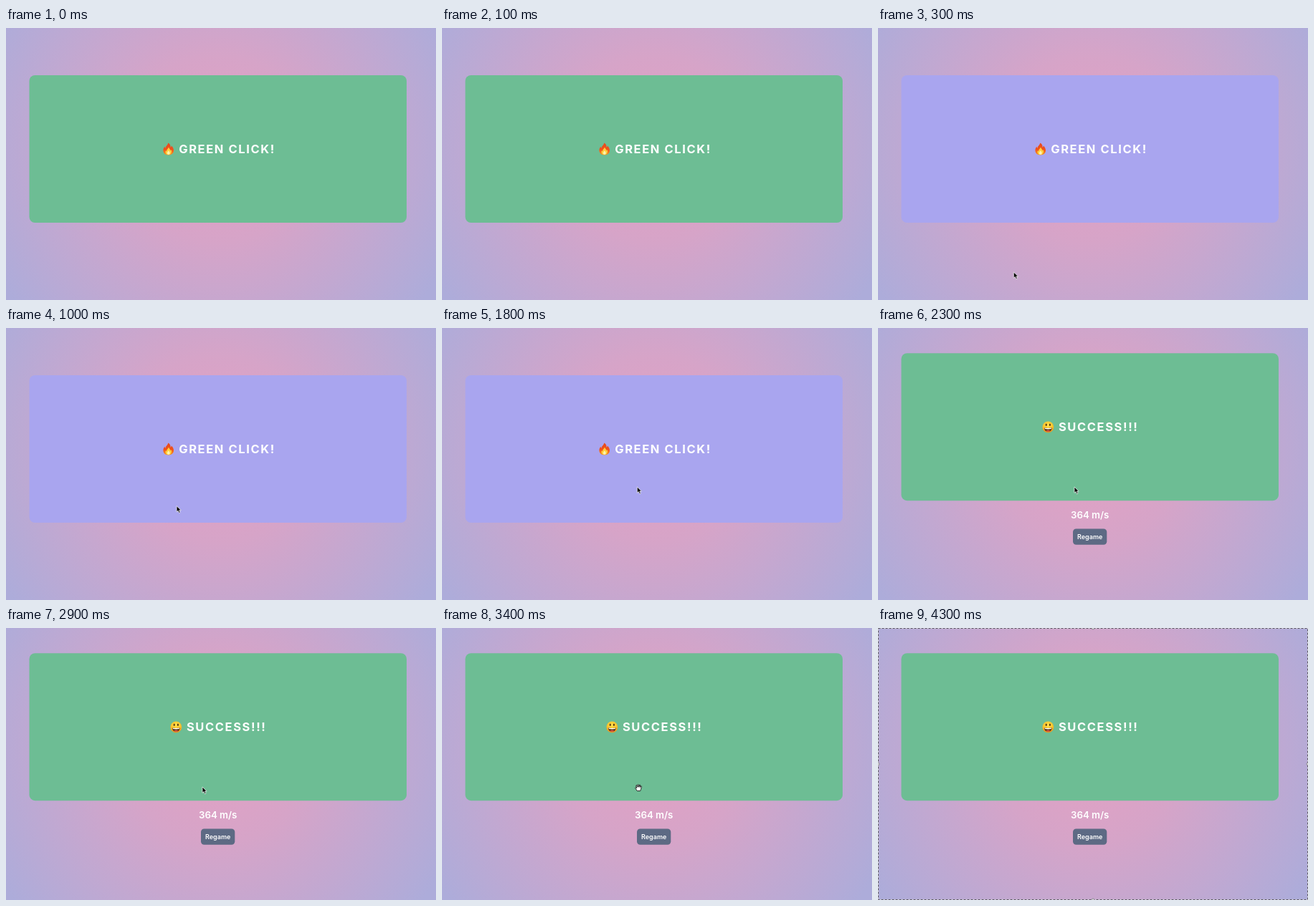
An HTML page for the animation above (4400 ms loop, 600 px wide and 380 px high).

```html
<!DOCTYPE html>
<html lang="en">
<head>
<meta charset="utf-8">
<title>Green click</title>
<style>
  html, body { margin: 0; width: 100%; height: 100%; overflow: hidden; }
  svg { display: block; width: 600px; height: 380px; }
  text { font-family: Inter, "Liberation Sans", sans-serif; fill: #fff; }
  .title { font-size: 16.5px; font-weight: 700; letter-spacing: 1.6px; }
  .score { font-size: 13.3px; font-weight: 600; }
  .button { font-size: 9px; font-weight: 600; }
</style>
</head>
<body>
<svg viewBox="0 0 600 380">
  <defs>
    <radialGradient id="sky" gradientUnits="userSpaceOnUse" cx="296" cy="169" r="355">
      <stop offset="0" stop-color="#e4a0c2"/>
      <stop offset="0.37" stop-color="#d6a4c8"/>
      <stop offset="1" stop-color="#adacda"/>
    </radialGradient>
    <linearGradient id="flameFill" x1="0" y1="0" x2="0" y2="1">
      <stop offset="0" stop-color="#e8491c"/>
      <stop offset="0.55" stop-color="#f0521b"/>
      <stop offset="1" stop-color="#f79a1e"/>
    </linearGradient>
    <radialGradient id="faceFill" cx="0.5" cy="0.35" r="0.65">
      <stop offset="0" stop-color="#ffe04a"/>
      <stop offset="0.65" stop-color="#fcc32c"/>
      <stop offset="1" stop-color="#ea8a1c"/>
    </radialGradient>
  </defs>

  <rect width="600" height="380" fill="url(#sky)"/>
  <rect id="panel" x="32.5" width="526.5" height="206" rx="8"/>

  <g id="prompt">
    <g transform="translate(219 160.5)">
      <path fill="url(#flameFill)" d="M7.3 0C10 1.5 10.8 4 10.5 6.2C11.4 5.8 11.8 4.9 11.8 4C14 6 15 8.5 15 10.6C15 14.5 12 17 7.7 17C3.3 17 .4 14.4 .4 10.6C.4 8.4 1.3 6.4 2.5 5C2.5 6.3 2.9 7 3.6 7.3C3.7 4.2 6.8 3.2 7.3 0Z"/>
      <path fill="#ffd23d" d="M8 5.8C8.3 8 10.5 9 10.6 11C11.3 10.7 11.6 10.1 11.7 9.5C12.6 12.8 11.5 16.3 7.8 16.3C4.2 16.3 2.8 13.6 3.8 10.4C4.2 11.3 4.7 11.5 5.2 11.5C5 9 7.6 8.3 8 5.8Z"/>
      <path fill="#fff3b0" d="M7.9 10.6C8.3 12 9.7 12.6 9.7 14.2C9.7 15.6 8.9 16.2 7.8 16.2C6.5 16.2 5.7 15.4 5.8 14.2C5.9 12.8 7.4 12.1 7.9 10.6Z"/>
    </g>
    <text class="title" x="241.2" y="174.9">GREEN CLICK!</text>
  </g>

  <g id="result">
    <circle cx="237.3" cy="138.4" r="7.9" fill="url(#faceFill)"/>
    <g fill="#54300f">
      <ellipse cx="234.7" cy="135.3" rx="1" ry="1.8"/>
      <ellipse cx="239.9" cy="135.3" rx="1" ry="1.8"/>
      <path d="M231.8 139.2Q237.3 140.6 242.8 139.2Q242.2 144.8 237.3 144.8Q232.4 144.8 231.8 139.2Z"/>
    </g>
    <path fill="#fff" d="M232.4 139.4Q237.3 140.6 242.2 139.4L241.7 141Q237.3 141.8 232.9 141Z"/>
    <path fill="#ec5a58" d="M234.2 143.7Q237.3 141.6 240.4 143.7Q237.3 145.4 234.2 143.7Z"/>
    <text class="title" x="251.9" y="144.2">SUCCESS!!!</text>
    <text class="score" x="295.7" y="266" text-anchor="middle">364 m/s</text>
    <rect x="272" y="280.5" width="47.3" height="22.2" rx="4.5" fill="#5d6a84"/>
    <text class="button" x="295.7" y="294.9" text-anchor="middle">Regame</text>
  </g>

  <path id="arrow" d="M0 0V8.3L2 6.6L3.5 9.8L5 9.1L3.6 6H6.2Z" fill="#000" stroke="#fff" stroke-width="0.7" stroke-linejoin="round"/>

  <path id="hand" transform="translate(269.3 218)" fill="#fff" stroke="#111" stroke-width="0.9" stroke-linejoin="round"
    d="M3 9.6L.8 6.2Q0 4.8 1.2 4.7L2.4 5.8L1.5 2.4Q1.6 1.2 2.6 1.8L3.8 4.3L3.6 1.2Q4.3 0 5 1.1L5.4 4.2L6.2 1.3Q7.2 .6 7.3 1.8L7.1 4.6L8.2 2.8Q9.3 2.5 9.1 3.7L8.2 7.4L7.4 9.6Z"/>

  <g id="frame">
    <rect x="0.5" y="0.5" width="599" height="379" fill="none" stroke="#dcd8e2"/>
    <rect x="0.5" y="0.5" width="599" height="379" fill="none" stroke="#5d5a64" stroke-dasharray="3 2"/>
    <g fill="#ddd" stroke="#77737e" stroke-width="0.7">
      <circle cx="300" cy="0" r="2"/>
      <circle cx="300" cy="380" r="2"/>
      <circle cx="0" cy="190" r="2"/>
      <circle cx="600" cy="190" r="2"/>
    </g>
  </g>
</svg>
<script>
  const LOOP = 4400, STEP = 100;
  const WAIT = 300, GO = 1900, CLICK = 2300, GRAB = 3400, SELECT = 3700;
  const GREEN = "#6dbd94", VIOLET = "#a9a5ef";

  // Pointer path: time, x, y
  const path = [[300, 189.3, 341], [800, 221, 262], [1400, 272.3, 222], [2200, 272.3, 222], [2300, 274, 222]];

  const el = id => document.getElementById(id);
  const [panel, prompt_, result, arrow, hand, frame] =
    ["panel", "prompt", "result", "arrow", "hand", "frame"].map(el);
  const show = (node, on) => node.setAttribute("visibility", on ? "visible" : "hidden");

  function pointerAt(t) {
    const i = path.findIndex(p => p[0] > t);
    if (i < 0) return path[path.length - 1].slice(1);
    if (i === 0) return path[0].slice(1);
    const a = path[i - 1], b = path[i], k = (t - a[0]) / (b[0] - a[0]);
    return [1, 2].map(n => a[n] + (b[n] - a[n]) * k);
  }

  function draw(time) {
    const t = Math.floor((time % LOOP) / STEP) * STEP;
    const won = t >= CLICK;
    panel.setAttribute("y", won ? 35.2 : 66);
    panel.setAttribute("fill", t >= WAIT && t < GO ? VIOLET : GREEN);
    show(prompt_, !won);
    show(result, won);
    show(arrow, t >= WAIT && t < GRAB);
    show(hand, t >= GRAB && t < SELECT);
    show(frame, t >= SELECT);
    arrow.setAttribute("transform", `translate(${pointerAt(t)})`);
  }

  const start = performance.now();
  function tick() {
    draw(performance.now() - start);
    requestAnimationFrame(tick);
  }
  tick();
</script>
</body>
</html>
```
